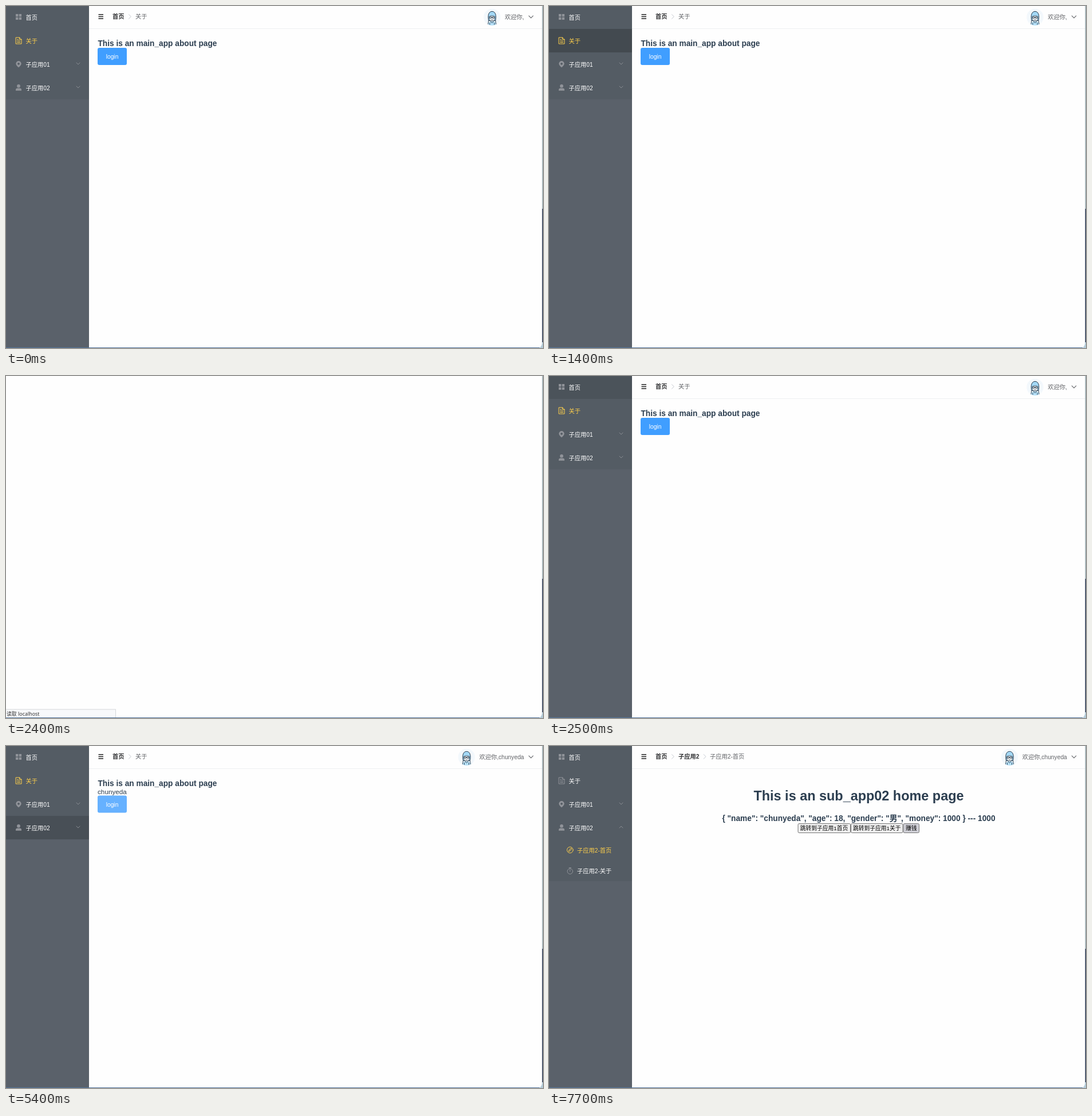
Recreate the animation shown at these times as an HTML page. Size 938x597 px, loop 8 s.

```html
<!DOCTYPE html>
<html lang="zh-CN">
<head>
<meta charset="utf-8">
<title>Admin panel</title>
<style>
html, body { margin: 0; width: 100%; height: 100%; overflow: hidden; background: #fefefe; }
svg { display: block; width: 100%; height: 100%; }
text { font: 10.25px "Liberation Sans", "Noto Sans CJK SC", "Noto Sans CJK", sans-serif; fill: #fff; white-space: pre; }
.line { fill: none; stroke: currentColor; stroke-linecap: round; stroke-linejoin: round; }
.icon { color: #909399; }
.on { color: #ffd04b; }
.on text { fill: #ffd04b; }
.on .icon { color: #ffd04b; }
.crumb { fill: #606266; }
.strong { font-weight: 700; fill: #303133; }
.sep { color: #c0c4cc; }
.h1, .h3 { font-weight: 700; fill: #2c3e50; }
.h1 { font-size: 23.43px; }
.h3 { font-size: 13.71px; }
.user { font-size: 11.72px; fill: #2c3e50; }
.mid { text-anchor: middle; }
.end { text-anchor: end; }
.native rect { fill: #efefef; stroke: #767676; }
.native text { font-size: 9.76px; fill: #000; text-anchor: middle; }
.status { font: 8.9px "Noto Sans", "Noto Sans CJK SC", "Noto Sans CJK", sans-serif; fill: #333; }
</style>
</head>
<body>
<svg viewBox="0 0 938 597">
  <defs>
    <clipPath id="clip"><rect id="clipBox" y="163" width="145" height="73"/></clipPath>
    <path id="down" class="line" d="M-3 -1.5 0 1.5 3 -1.5" stroke-width=".9"/>
    <path id="next" class="line" d="M-1.8 -3.8 2 0 -1.8 3.8" stroke-width=".9"/>
  </defs>
  <rect width="938" height="597" fill="#fefefe"/>

  <g id="app">
    <rect width="145" height="597" fill="#5a616a"/>
    <rect id="menu" width="145" height="163" fill="#545c64"/>
    <rect id="hover" width="145" fill="#434a50"/>

    <g class="icon" fill="currentColor">
      <path d="M17 14h4.4v4.4H17zM22.7 14h4.4v4.4h-4.4zM17 19.7h4.4v4.4H17zM22.7 19.7h4.4v4.4h-4.4z"/>
      <path d="M22 96a4.7 4.7 0 0 1 4.7 4.7C26.7 103.300 24 105.500 22 107.200 20 105.500 17.300 103.300 17.300 100.700A4.700 4.700 0 0 1 22 96zm0 2.900a1.900 1.900 0 1 0 .01 0z" fill-rule="evenodd"/>
      <circle cx="22" cy="139.700" r="2.900"/>
      <path d="M17 147.800v-1.500q0-2.800 2.800-2.800h4.400q2.800 0 2.800 2.800v1.500z"/>
      <use href="#down" x="126" y="100.500"/>
      <use href="#down" id="arrow"/>
    </g>
    <text x="34.500" y="23.500">首页</text>
    <g id="about">
      <path class="line icon" d="M17.500 55h6l3.500 3.500V66h-9.500zM23.500 55v3.500H27M19.600 58.500h1.800M19.600 61h5M19.600 63.500h5" stroke-width="1"/>
      <text x="34.500" y="64.500">关于</text>
    </g>
    <text x="34.500" y="105.500">子应用01</text>
    <text x="34.500" y="146.500">子应用02</text>

    <g id="sub" clip-path="url(#clip)">
      <g id="subHome">
        <g class="icon">
          <circle class="line" cx="36.800" cy="181.500" r="5.300"/>
          <path class="line" d="M39.500 178.800 37.800 182.500 34.100 184.200 35.800 180.500z" stroke-width=".9"/>
        </g>
        <text x="49" y="185.500">子应用2-首页</text>
      </g>
      <g class="icon">
        <circle class="line" cx="36.800" cy="218.800" r="4.700"/>
        <path class="line" d="M35 212.500h3.600M36.800 212.500v1.600M36.800 216.200v2.800"/>
      </g>
      <text x="49" y="222">子应用2-关于</text>
    </g>

    <path d="M145 39.500h792" stroke="#eef0f2"/>
    <path d="M161.500 15h8.500M161.500 18.500h8.500M161.500 22h8.500" stroke="#222" stroke-width="1.400"/>
    <text class="strong" x="186" y="22">首页</text>
    <use href="#next" class="sep" x="216.300" y="18.500"/>
    <text id="crumb" class="crumb" x="226" y="22">关于</text>
    <g id="lastCrumb">
      <use href="#next" class="sep" x="272" y="18.500"/>
      <text class="crumb" x="281" y="22">子应用2-首页</text>
    </g>

    <g id="avatar">
      <circle r="14.700" fill="#f3f8fc"/>
      <path d="M-7 12.800Q-6 7 0 7T7 12.800Q0 16 -7 12.800z" fill="#b5e0f8"/>
      <path d="M-6 6C-8-3-6-10 0-10S8-3 6 6z" fill="#a3d8f6" stroke="#24384a"/>
      <path d="M-4.800-1.500Q0-3.500 4.800-1.500V3Q4 7 0 7T-4.800 3z" fill="#fff" stroke="#24384a" stroke-width=".8"/>
      <path class="line" color="#24384a" d="M-4-.5h3v2.300h-3zM1-.5h3v2.300H1zM-1 .3h2M-1.500 4.500Q0 5.500 1.500 4.500M-3 7.500 0 10 3 7.500M-6 6 -7 12M6 6 7 12M-4 10v3M4 10v3" stroke-width=".9"/>
    </g>
    <text id="welcome" class="crumb end" x="904.800" y="22.500"></text>
    <use href="#down" transform="translate(917 19) scale(1.250)" color="#606266"/>

    <g id="aboutPage">
      <text class="h3" x="160.500" y="69.500">This is an main_app about page</text>
      <text id="user" class="user" x="160" y="84.300"></text>
      <g id="login">
        <rect id="loginBox" x="160" y="73" width="51" height="30" rx="3"/>
        <text class="mid" x="185.500" y="92.300">login</text>
      </g>
    </g>

    <g id="homePage">
      <text class="h1 mid" x="541" y="95">This is an sub_app02 home page</text>
      <text id="info" class="h3 mid" x="541" y="131"></text>
      <g class="native">
        <rect x="435" y="135.500" width="91.500" height="16" rx="2"/>
        <rect x="527.500" y="135.500" width="90.500" height="16" rx="2"/>
        <rect id="earn" x="619" y="135.500" width="27.500" height="16" rx="2"/>
        <text x="480.500" y="147.300">跳转到子应用1首页</text>
        <text x="572.700" y="147.300">跳转到子应用1关于</text>
        <text x="632.700" y="147.300">赚钱</text>
      </g>
    </g>
  </g>

  <g id="status">
    <rect x="-.5" y="582" width="192" height="14.500" fill="#f8f9fb" stroke="#d5d7da"/>
    <text class="status" x="1" y="592.500">读取 localhost</text>
  </g>

  <!-- window edge -->
  <path d="M937.300 0V354" stroke="#94a5ac" stroke-width="1.400"/>
  <path d="M937.300 354V587" stroke="#1c2b45" stroke-width="1.400"/>
  <path d="M938 587v10h-8q6-1 6.500-10z" fill="#b4cbd8"/>
  <path d="M0 596.500H932" stroke="#52749b"/>
</svg>
<script>
const $ = id => document.getElementById(id);
const set = (id, attrs) => {
  for (const key in attrs) $(id).setAttribute(key, attrs[key]);
};
const show = (id, on) => set(id, { visibility: on ? 'visible' : 'hidden' });
// value of the last step that has begun
const at = (t, steps) => steps.filter(s => s[0] <= t).pop().slice(1);

const LOOP = 8000, TICK = 100, NAME = 'chunyeda';
const BLUE = '#409eff', LIGHT = '#66b1ff', PRESSED = '#3a8ee6';

const HOVER = [ // time, top, height, opacity
  [0, 0, 0, 0], [1400, 40, 41, 1], [1700, 0, 0, 0],
  [2100, 0, 40, .5], [2200, 0, 40, 1], [2300, 0, 40, .5],
  [2500, 0, 40, .5], [2600, 0, 40, 1], [2700, 0, 40, .4], [2800, 0, 0, 0],
  [5400, 122, 41, .7], [5600, 122, 41, 1],
  [6200, 163, 36.500, 1], [6300, 163, 36.500, .5], [6400, 0, 0, 0]
];
const LOGIN = [
  [0, BLUE], [1000, LIGHT], [1200, BLUE], [3400, LIGHT],
  [3500, PRESSED], [3600, LIGHT], [5600, BLUE]
];

$('info').textContent =
  `{ "name": "${NAME}", "age": 18, "gender": "男", "money": 1000 } --- 1000`;

function draw(t) {
  const loggedIn = t >= 3500, home = t >= 6300, blank = t >= 2400 && t < 2500;
  $('app').style.display = blank ? 'none' : '';
  show('status', blank);

  const [y, height, opacity] = at(t, HOVER);
  set('hover', { y, height, opacity });

  const p = Math.min(1, Math.max(0, (t - 5500) / 400));
  const open = p * p * (3 - 2 * p);
  set('menu', { height: 163 + 73 * open });
  set('clipBox', { height: 73 * open });
  set('sub', { opacity: open });
  set('arrow', { transform: `translate(126 141.500) rotate(${180 * open})` });

  set('about', { class: home ? '' : 'on' });
  set('subHome', { class: home ? 'on' : '' });
  set('crumb', { class: home ? 'strong' : 'crumb' });
  $('crumb').textContent = home ? '子应用2' : '关于';
  for (const id of ['lastCrumb', 'homePage']) show(id, home);
  show('aboutPage', !home);

  $('user').textContent = loggedIn ? NAME : '';
  $('welcome').textContent = '欢迎你,' + (loggedIn ? NAME : '');
  set('avatar', { transform: `translate(${loggedIn ? 804.500 : 849} 19.500)` });
  set('login', { transform: `translate(0 ${loggedIn ? 13.500 : 0})` });
  set('loginBox', { fill: at(t, LOGIN)[0] });
  $('earn').style.fill = t >= 7700 ? '#d0d0d7' : '';
}

const start = performance.now();
function frame() {
  const t = (performance.now() - start) % LOOP;
  draw(Math.floor(t / TICK) * TICK);
  requestAnimationFrame(frame);
}
frame();
</script>
</body>
</html>
```
